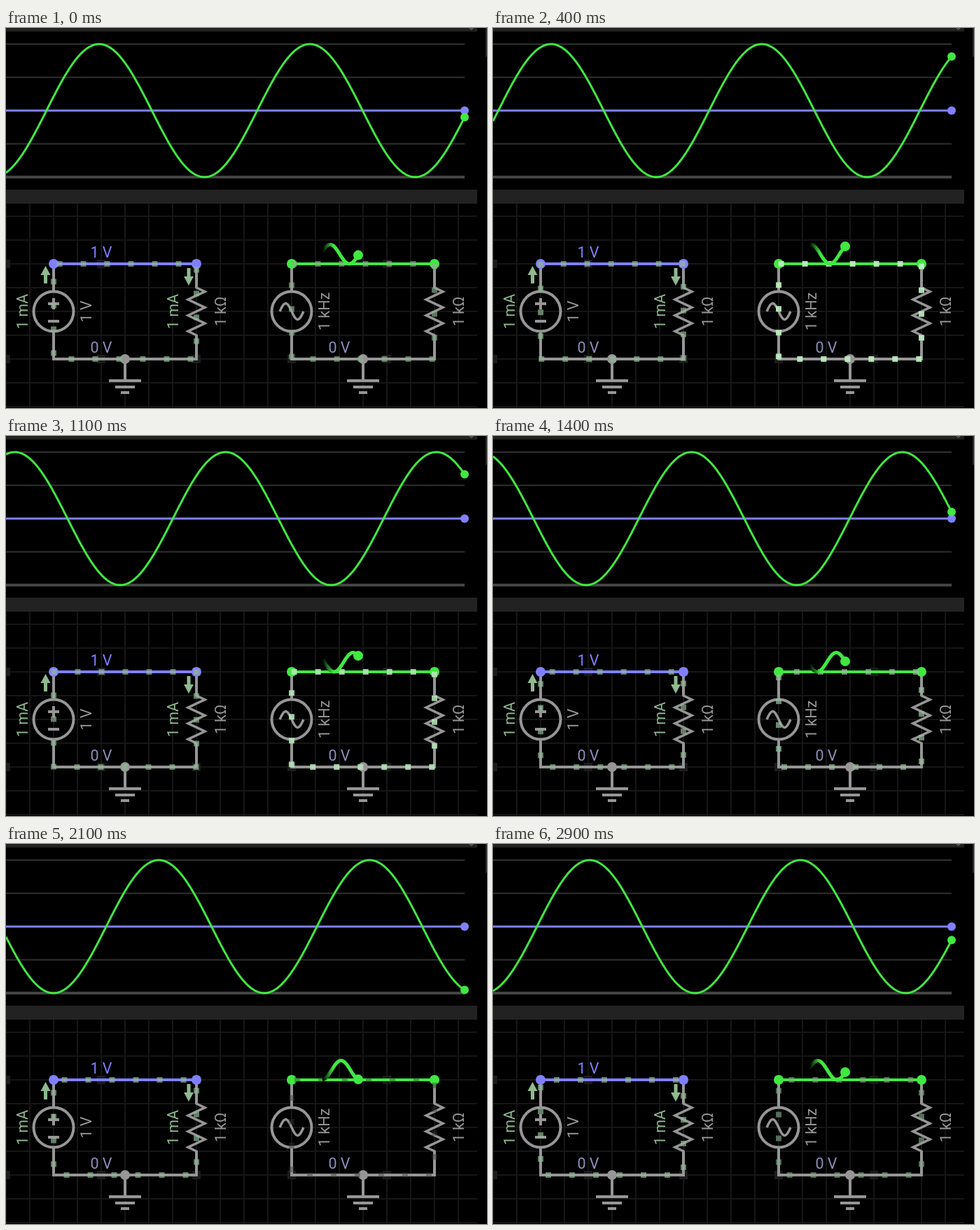
These frames come from a looping animation (687 px wide and 543 px high, 3000 ms). An HTML page with a canvas:

```html
<!DOCTYPE html>
<html lang="en">
<head>
<meta charset="utf-8">
<title>DC and AC circuit</title>
<style>
html, body { margin: 0; width: 100%; height: 100%; overflow: hidden; background: #000; }
canvas { display: block; }
</style>
</head>
<body>
<canvas id="stage" width="687" height="543"></canvas>
<script>
const ctx = document.getElementById('stage').getContext('2d');
const TAU = Math.PI * 2;
const GREEN = '#40e840', BLUE = '#8080ff', GRAY = '#969696', SAGE = '#8fb98f';
const TOP = 337, BOTTOM = 473, MID = 405, GAP = 34;

// [picture step, simulation tick, charge travel in px]
const KEYS = [
  [0, 0, 8.5], [4, 10, 32.7], [11, 24, 68.5], [15, 32, 90.1],
  [16, 32, 90.1], [17, 34, 95.5], [21, 43, 117.5], [29, 59, 159]
];

function stateAt(step) {
  let i = 0;
  while (i < KEYS.length - 2 && step > KEYS[i + 1][0]) i++;
  const a = KEYS[i], b = KEYS[i + 1];
  const f = (step - a[0]) / (b[0] - a[0]);
  return { tick: a[1] + (b[1] - a[1]) * f, travel: a[2] + (b[2] - a[2]) * f };
}

const phaseAt = tick => TAU * (tick + 44.05) / 60;

function line(points, color, width) {
  ctx.beginPath();
  points.forEach(([x, y]) => ctx.lineTo(x, y));
  ctx.strokeStyle = color;
  ctx.lineWidth = width;
  ctx.stroke();
}

function curve(x0, x1, fn, color, width) {
  const points = [];
  for (let x = x0; x < x1; x++) points.push([x, fn(x)]);
  points.push([x1, fn(x1)]);
  line(points, color, width);
}

function disc(x, y, r, color) {
  ctx.beginPath();
  ctx.arc(x, y, r, 0, TAU);
  ctx.fillStyle = color;
  ctx.fill();
}

function rect(x, y, w, h, color) {
  ctx.fillStyle = color;
  ctx.fillRect(x, y, w, h);
}

function label(text, x, y, color, upright) {
  ctx.save();
  ctx.translate(x, y);
  if (upright) ctx.rotate(-Math.PI / 2);
  ctx.font = '21.5px Roboto, sans-serif';
  ctx.textAlign = 'center';
  ctx.fillStyle = color;
  ctx.fillText(text, 0, 7.6);
  ctx.restore();
}

function arrow(x, tip, dir) {
  const p = [[0, 0], [7, 13], [2.5, 13], [2.5, 25], [-2.5, 25], [-2.5, 13], [-7, 13]];
  ctx.beginPath();
  p.forEach(([dx, dy]) => ctx.lineTo(x + dx, tip + dy * dir));
  ctx.fillStyle = SAGE;
  ctx.fill();
}

function drawScope(phase) {
  for (let i = 0; i < 4; i++) line([[0, 23 + 47.5 * i], [655, 23 + 47.5 * i]], '#303030', 2);
  line([[0, 213], [655, 213]], '#444', 4);
  const wave = x => 118 - 95 * Math.cos(phase + TAU * (x - 655) / 301);
  line([[0, 118], [655, 118]], BLUE, 3);
  curve(0, 655, wave, GREEN, 3);
  disc(655, 118, 6, BLUE);
  disc(655, wave(655), 6, GREEN);
}

function drawGrid() {
  for (let x = 0; x < 673; x += GAP) rect(x - 1, 251, 2, 292, '#161616');
  for (let y = 269; y < 543; y += GAP) rect(0, y - 1, 673, 2, '#161616');
  for (let x = 0; x < 673; x += 4 * GAP) {
    for (const y of [TOP, BOTTOM]) rect(x - 6, y - 6, 12, 12, '#1c1c1c');
  }
}

function drawBars() {
  rect(0, 0, 673, 5, '#222');
  rect(0, 231, 673, 20, '#222');
  line([[661, -1], [664.5, 2], [668, -1]], '#666', 1.5);
  rect(685, 0, 2, 41, '#2a2a2a');
}

function drawCircuit(x, live) {
  const right = x + 204, mid = x + 102;
  line([[x, 433], [x, BOTTOM], [right, BOTTOM], [right, 439]], GRAY, 4);
  line([[x, TOP], [x, 377]], GRAY, 4);

  const zig = [[right, TOP], [right, 371]];
  for (let i = 0; i < 6; i++) {
    zig.push([right + (i % 2 ? -12 : 12), 371 + (i + 0.5) * 68 / 6]);
  }
  zig.push([right, 439], [right, 441]);
  line(zig, GRAY, 3.5);
  line([[right, TOP], [right, 371]], GRAY, 4);

  ctx.beginPath();
  ctx.arc(x, MID, 28.5, 0, TAU);
  ctx.lineWidth = 4;
  ctx.stroke();

  line([[mid, BOTTOM], [mid, 504]], GRAY, 4);
  [[504, 23], [513, 14], [521, 6]].forEach(([y, w]) =>
    line([[mid - w, y], [mid + w, y]], GRAY, 4));

  line([[x, TOP], [right, TOP]], live, 4);
  disc(mid, BOTTOM, 7, GRAY);
  disc(x, TOP, 7, live);
  disc(right, TOP, 7, live);
  label('0 V', x + 68, 456, '#8f8fbc');
  label('1 kΩ', x + 238, MID, GRAY, true);
}

// Charges run clockwise around the 204 x 136 loop.
function drawCharges(x, travel, current) {
  const k = 0.1 + 0.9 * Math.sqrt(current / 2);
  const rgb = [200, 250, 205].map(c => Math.round(c * k)).join();
  const color = `rgba(${rgb},${0.4 + 0.28 * current})`;
  for (let s = travel % GAP; s < 680; s += GAP) {
    let px, py;
    if (s < 204) [px, py] = [x + s, TOP];
    else if (s < 340) [px, py] = [x + 204, TOP + s - 204];
    else if (s < 544) [px, py] = [x + 544 - s, BOTTOM];
    else [px, py] = [x, BOTTOM + 544 - s];
    rect(px - 4, py - 4, 8, 8, color);
  }
}

function drawTrail(phase) {
  const fade = ctx.createLinearGradient(452, 0, 503, 0);
  fade.addColorStop(0, '#000');
  fade.addColorStop(0.3, GREEN);
  const wave = x => TOP - 13.75 * (1 + Math.cos(phase + TAU * (x - 503) / 54.4));
  curve(452, 503, wave, fade, 5);
  disc(503, wave(503), 7, GREEN);
}

function draw(step) {
  const { tick, travel } = stateAt(step);
  const phase = phaseAt(tick);
  rect(0, 0, 687, 543, '#000');
  drawScope(phase);
  drawGrid();
  drawBars();

  drawCircuit(68, BLUE);
  line([[60, 394], [76, 394]], GRAY, 4);
  line([[68, 386], [68, 402]], GRAY, 4);
  line([[60, 419], [76, 419]], GRAY, 4);
  label('1 V', 136, 320, BLUE);
  label('1 V', 114, MID, GRAY, true);
  label('1 mA', 23, MID, SAGE, true);
  label('1 mA', 238, MID, SAGE, true);
  arrow(56.5, 340, 1);
  arrow(261, 368, -1);
  drawCharges(68, travel, 1);

  drawCircuit(408, GREEN);
  curve(391, 425, x => MID - 11.5 * Math.sin(TAU * (x - 391) / 34), GRAY, 3.5);
  label('1 kHz', 454, MID, GRAY, true);
  const swing = 24.25 * (Math.sin(phase) - Math.sin(phaseAt(0)));
  drawCharges(408, travel - 5 + swing, 1 + Math.cos(phase));
  drawTrail(phase);
}

function loop() {
  draw(Math.floor(performance.now() % 3000 / 100));
  requestAnimationFrame(loop);
}
loop();
</script>
</body>
</html>
```
